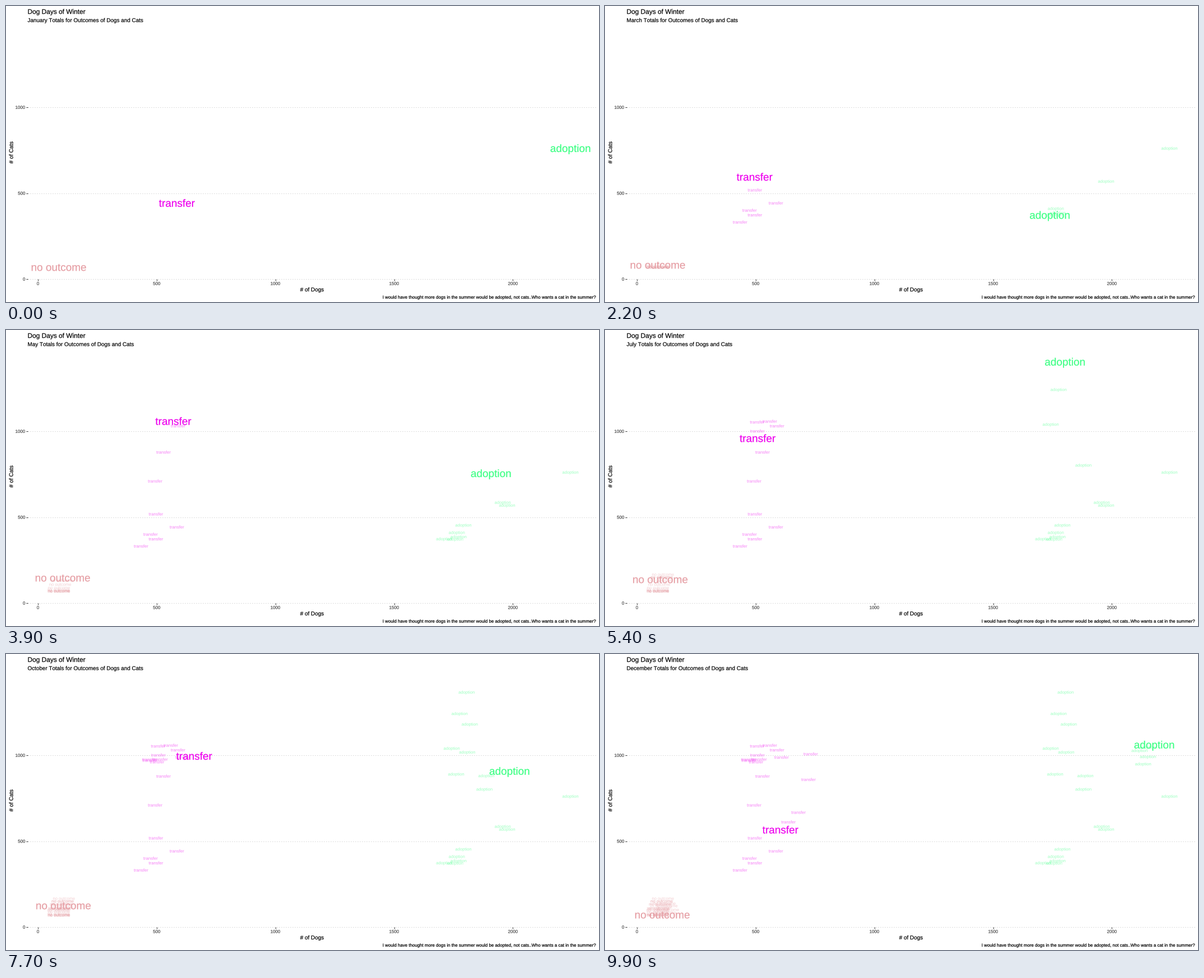
A matplotlib script for the animation above (10 s loop, 1058 by 529 pixels).

```python
import numpy as np
import matplotlib.pyplot as plt
from matplotlib.animation import FuncAnimation
from matplotlib.patches import PathPatch, Rectangle
from matplotlib.textpath import TextPath
from matplotlib.transforms import Affine2D

W, H, DPI = 1058, 529, 100
FRAMES, STEP, TRAIL = 100, 9, 5
BIG, SMALL, AXIS, LABEL, TITLE = 18.95, 7.6, 7.9, 9.9, 11.9
LEFT, RIGHT, TOP, BOTTOM = 38.5, 1053, 34, 488
MONTHS = ("January February March April May June July August "
          "September October November December").split()
YEAR = np.arange(12)


def bump(center, width):
    return np.exp(-((YEAR - center) / width) ** 2)


# Colour, dogs and cats per month; the small group follows a seasonal rule
OUTCOMES = {
    "adoption": (
        "#3dff84",
        [2242, 1762, 1775, 1692, 1990, 1742, 1802, 1826, 1742, 2180, 2116, 2178],
        [762, 416, 372, 375, 613, 1041, 1405, 1070, 840, 964, 1028, 1062]),
    "no outcome": (
        "#e69ea4",
        88 + YEAR * (1.9 + 2.6 * np.cos(2 * np.pi * (YEAR - 9.7) / 5)),
        70 + 97 * bump(5, 1.7) + 72 * bump(9, 1.1)),
    "transfer": (
        "#ee00ee",
        [585, 426, 498, 492, 602, 506, 508, 451, 535, 756, 680, 604],
        [443, 318, 442, 787, 1062, 1054, 960, 976, 977, 1012, 668, 567]),
}

plt.rcParams["font.family"] = "Liberation Sans"
plt.rcParams["text.kerning_factor"] = 12  # effectively no kerning
fig = plt.figure(figsize=(W / DPI, H / DPI), dpi=DPI, facecolor="white")
ax = fig.add_axes([0, 0, 1, 1])
ax.set(xlim=(0, W), ylim=(H, 0))
ax.axis("off")
panel = Rectangle((LEFT, TOP), RIGHT - LEFT, BOTTOM - TOP, fill=False, ec="none")
ax.add_patch(panel)


def to_px(dogs, cats):
    return 57 + 0.4237 * dogs, BOTTOM - 0.307 * cats


def place(x, y, angle=0):
    return Affine2D().scale(1, -1).rotate_deg(angle).translate(x, y) + ax.transData


def glyphs(text, size, align=0.5):
    """Outline anchored at `align` of its width and half the letter height."""
    path = TextPath((0, 0), text, size=size)
    box = path.get_extents()
    shift = align * (box.x0 + box.x1)
    return Affine2D().translate(-shift, -0.36 * size).transform_path(path)


def write(text, x, y, size, color="black", align=0.5, angle=0, lw=0.15, **kw):
    patch = PathPatch(glyphs(text, size, align), fc=color, ec=color, lw=lw,
                      transform=place(x, y, angle), **kw)
    return ax.add_patch(patch)


def line(xs, ys, color, **kw):
    ax.plot(xs, ys, color=color, lw=72 / DPI, **kw)


def position(dogs, cats, i):
    month = i / STEP
    return to_px(np.interp(month, YEAR, dogs), np.interp(month, YEAR, cats))


for n in range(0, 2001, 500):
    x, y = to_px(n, n)
    line([x, x], [BOTTOM, BOTTOM + 2.7], "#333333", solid_capstyle="butt")
    write(str(n), x, 495.8, AXIS, "#4d4d4d")
    if n <= 1000:
        line([LEFT, RIGHT], [y, y], "#bebebe", dashes=(1, 3), zorder=1)
        line([LEFT - 2.7, LEFT], [y, y], "#333333", solid_capstyle="butt")
        write(str(n), 34.4, y, AXIS, "#4d4d4d", align=1)

write("Dog Days of Winter", LEFT, 9.8, TITLE, align=0)
write("# of Dogs", 545.8, 506.5, LABEL)
write("# of Cats", 9, 262, LABEL, angle=-90)
write("I would have thought more dogs in the summer would be adopted, "
      "not cats..Who wants a cat in the summer?", RIGHT, 520.2, AXIS, align=1)

subtitles = [glyphs(m + " Totals for Outcomes of Dogs and Cats", LABEL, 0)
             for m in MONTHS]
subtitle = write(MONTHS[0], LEFT, 25.2, LABEL, align=0)

trail, heads = [], []
for name, (color, dogs, cats) in OUTCOMES.items():
    for i in range(0, FRAMES, TRAIL):
        mark = write(name, *position(dogs, cats, i), SMALL, color,
                     lw=0, alpha=0.5, zorder=3)
        mark.set_clip_path(panel)
        trail.append((i, mark))
    head = write(name, *position(dogs, cats, 0), BIG, color, zorder=4)
    head.set_clip_path(panel)
    heads.append((dogs, cats, head))


def update(i):
    subtitle.set_path(subtitles[round(i / STEP)])
    for start, mark in trail:
        mark.set_visible(start < i)
    for dogs, cats, head in heads:
        head.set_transform(place(*position(dogs, cats, i)))
    return []


anim = FuncAnimation(fig, update, frames=FRAMES, interval=100,
                     repeat=True, repeat_delay=0, init_func=lambda: [])
plt.show()
```
